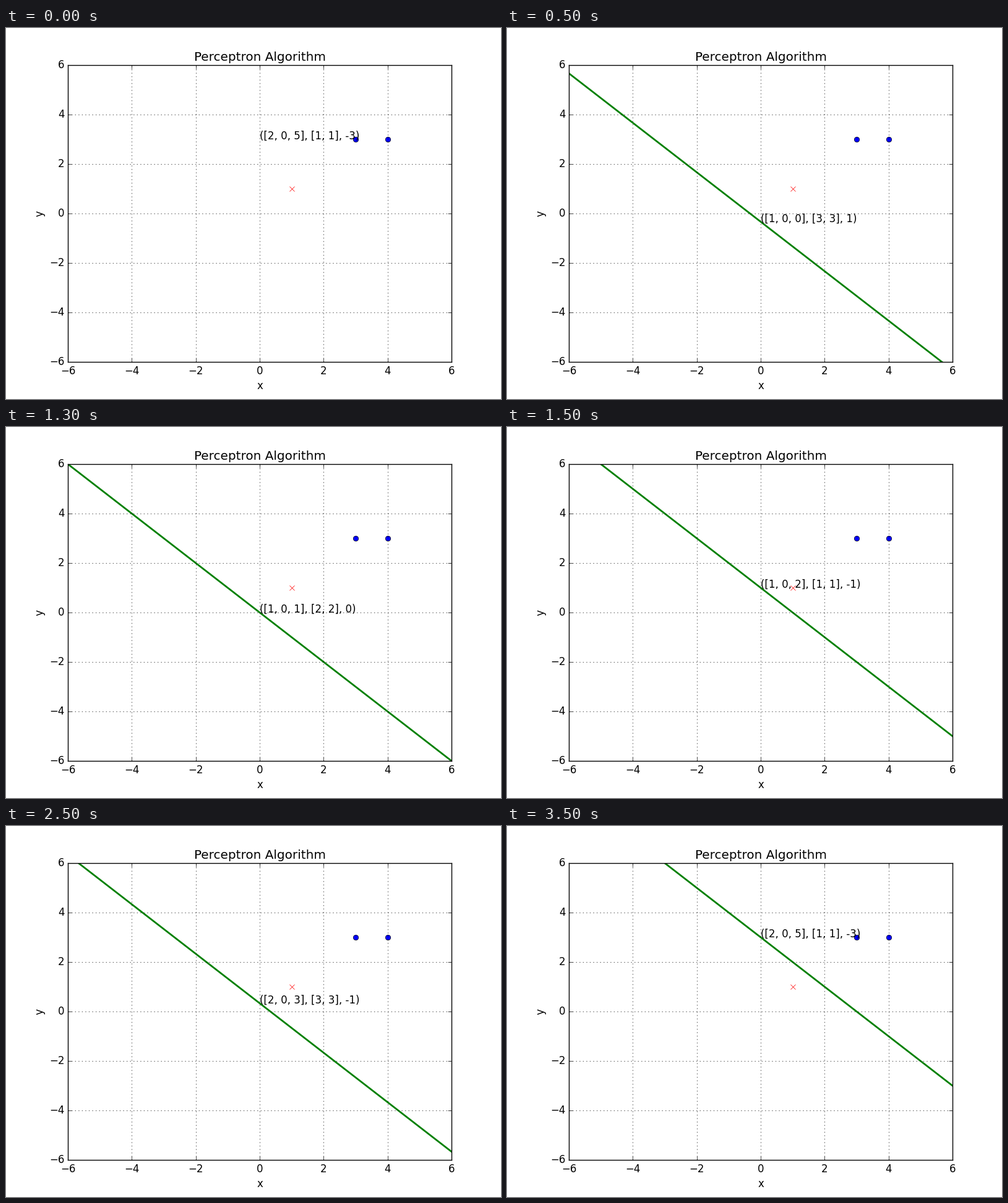
Write a matplotlib script that moves like this. It is 800 px wide and 600 px high and loops after 4 s.

```python
import numpy as np
import matplotlib.pyplot as plt
from matplotlib.animation import FuncAnimation

plt.style.use("classic")
plt.rcParams["font.family"] = "DejaVu Sans"

LIMIT = 6
SAMPLES = [((3, 3), 1), ((4, 3), 1), ((1, 1), -1)]


def train():
    """Dual perceptron: list of (alphas, weights, bias) after every update."""
    alphas, w, b = [0, 0, 0], np.zeros(2, int), 0
    history = []
    while True:
        for i, (point, label) in enumerate(SAMPLES):
            if label * (w @ point + b) <= 0:
                alphas[i] += 1
                w = w + label * np.array(point)
                b += label
                history.append((alphas[:], w.tolist(), b))
                break
        else:
            return history


history = train()

fig, ax = plt.subplots(figsize=(8, 6), dpi=100, facecolor="white")
ax.set(xlim=(-LIMIT, LIMIT), ylim=(-LIMIT, LIMIT), xlabel="x", ylabel="y",
       title="Perceptron Algorithm")
ax.grid(True)

for (x, y), label in SAMPLES:
    ax.plot(x, y, "bo" if label > 0 else "rx")

xs = np.array([-LIMIT, LIMIT])
boundary, = ax.plot([], [], "g", lw=2)
caption = ax.text(0, 0, "")


def update(frame):
    # The first frame shows the final state without its boundary.
    step = (frame - 1) % len(history)
    if not history[step][1][1]:
        step -= 1  # zero weights define no line, so the last one stays
    alphas, w, b = history[step]
    boundary.set_data(xs, -(w[0] * xs + b) / w[1])
    boundary.set_visible(frame > 0)
    caption.set_position((0, -b / w[1]))
    caption.set_text(f"({alphas}, {w}, {b})")
    return boundary, caption


anim = FuncAnimation(fig, update, frames=len(history) + 1, interval=500,
                     repeat=True, repeat_delay=0)
plt.show()
```
